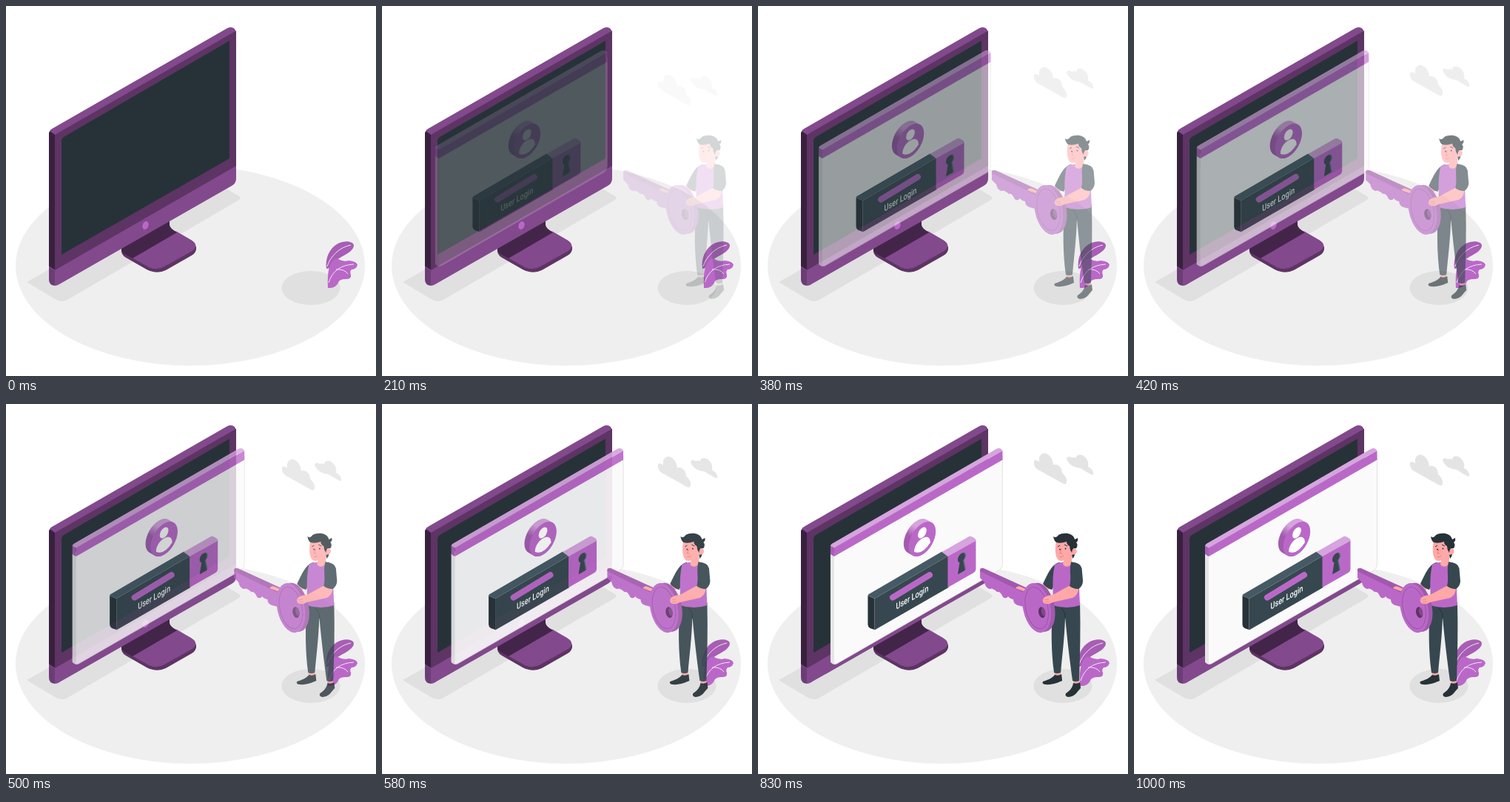
These frames come from a looping animation (500x500 px, 1.04 s). An HTML page:

```html
<!DOCTYPE html>
<html lang="en">
<head>
<meta charset="utf-8">
<title>User login</title>
<style>
html, body { margin: 0; width: 100%; height: 100%; overflow: hidden; background: #fff }
svg { display: block; width: 100vw; height: 100vh }
text { font: 500 12.2px Roboto, sans-serif }
</style>
</head>
<body>
<svg viewBox="0 0 500 500">
  <defs>
    <linearGradient id="rim" gradientUnits="userSpaceOnUse" x1="-19" y1="11" x2="11" y2="-19">
      <stop offset=".4" stop-color="#a35bb0"/><stop offset=".7" stop-color="#d6a4de"/>
    </linearGradient>
    <path id="hole" d="M-2.6 -1A5.6 5.8 0 1 1 2.6 -1L5.5 13.5H-5.5Z"/>
  </defs>

  <!-- floor and shadows -->
  <ellipse cx="249" cy="351" rx="236" ry="135" fill="#efefef"/>
  <path fill="#e0e0e0" d="M28 373L66 396Q75 402 83 397L315 262Q318 259 315 257L298 247L60 355Z"/>
  <ellipse cx="412" cy="381" rx="39.5" ry="23" fill="#e0e0e0"/>

  <!-- monitor -->
  <path fill="#5d3464" d="M156 328Q155 336 162 340L190 356Q204 363 216 357L251 337Q258 333 257 325L200 320Z"/>
  <path fill="#82498c" d="M221 298Q222 302 231 305L250 316Q258 321 256 326Q255 329 250 332L214 352Q204 358 193 353L170 340Z"/>
  <path fill="#43254a" d="M156 325L221 288V296Q222 301 231 306L171 341L162 336Q156 333 156 330Z"/>
  <path fill="#82498c" d="M58 174Q58 168 62 166L299 30Q308 26 311 35L66 176Z"/>
  <path fill="#5d3464" d="M66 174L311 33.500V218L66 358Z"/>
  <path fill="#3a203f" d="M58 171Q60 169 62 171L66 174V357L58 352Z"/>
  <path fill="#82498c" d="M66 357L311 216V233Q311 240 305 243L72 376Q69 378 66 378Z"/>
  <path fill="#6c3d75" d="M58 352L66 357V378Q58 377 58 370Z"/>
  <path fill="#263238" d="M75 182Q75 179 78 177L302 47V206L75 336Z"/>
  <ellipse cx="188.500" cy="296.500" rx="4" ry="5.600" transform="rotate(20 188.500 296.500)" fill="#ba68c8"/>

  <!-- plant -->
  <path fill="#a75eb4" d="M433 355C431 341 437 328 447 322C455 317 468 317 470 323C470 329 464 333 457 337C448 342 440 346 438 354Z"/>
  <path fill="#ba68c8" d="M435 381C434 362 436 351 441 345Q444 340 449 342Q456 346 463 344Q474 345 475 350Q473 356 467 356Q464 359 466 363Q467 369 460 369Q450 369 449 374Q445 382 435 381Z"/>
  <path fill="none" stroke="#f3e3f5" d="M434 352C438 339 450 326 466 323M436 374C441 358 452 350 470 349M446 356Q457 355 462 362"/>

  <g id="clouds" fill="#e4e4e4">
    <path d="M373 82C372 77 376 77 380 80C379 72 383 68 388 68.500C395 71 398 76 399 84C406 82 411 88 411 95C416 99 419 106 416 110C413 111 408 107 404 105L379 91C375 89 373 85 373 82Z"/>
    <path d="M417 76C418 72 422 73 424 75Q426 73 430 75C430 70 437 69 441 73C446 77 447 82 446 87C450 88 454 93 453 98C449 97 445 94 441 92Q436 88 431 88C423 86 419 81 417 76Z"/>
  </g>

  <g id="panel">
    <path fill="#fafafa" stroke="#dcdcdc" stroke-width=".8" d="M100 200L328 70V217Q328 222 323 225L104 351Q100 353 96 349Z"/>
    <path fill="#e6e6e6" d="M95.500 202L100.500 206V352L97 350Q95.500 349 95.500 346Z"/>
    <path fill="#ba68c8" d="M100.500 194L328 63V75.500L100.500 206Z"/>
    <path fill="#a95fb6" d="M95.500 191L100.500 194V206L95.500 203Z"/>
    <path fill="#d6a4de" d="M95.500 191.500Q96 189.500 98 188.500L320 60.500Q325 58 328 63L100.500 194.500Z"/>

    <!-- avatar badge -->
    <g transform="matrix(.866 -.5 0 1 219.500 182.500)" fill="#fff">
      <path d="M0 0L-8 -8" stroke="url(#rim)" stroke-width="42" stroke-linecap="round"/>
      <circle r="21" fill="#ba68c8"/>
      <circle cy="-8.500" r="6.800"/>
      <path d="M-12.500 11C-13 -5 13 -5 12.500 11Q0 22 -12.500 11Z"/>
    </g>

    <!-- login bar -->
    <path fill="#263238" d="M146 259L155 263V305L149 303Q146 301 146 298Z"/>
    <path fill="#37474f" d="M155 263L255 205V248L155 305.500Z"/>
    <path fill="#455a64" d="M146 259Q146 257 149 256L246 199.500L255 205L155 263Z"/>
    <path fill="#ba68c8" d="M254 205.500L292 184V223Q292 226 289 228L254 248Z"/>
    <path fill="#d6a4de" d="M246 200L281 180Q284 178 287 179.500L291 182Q292 183 292 185L254 206Z"/>
    <path stroke="#ba68c8" stroke-width="8" stroke-linecap="round" d="M179.500 261.500L229.500 231"/>
    <text transform="matrix(.75 -.433 0 1 184 278)" fill="#fff">User Login</text>
    <g transform="matrix(.866 -.5 0 1 273 213.500)">
      <use href="#hole" x=".8" fill="#546e7a"/>
      <use href="#hole" x="-.8" fill="#37474f"/>
    </g>
  </g>

  <g id="man">
    <!-- shoes, legs -->
    <path fill="#ffa8a7" d="M402 360H411V369H403ZM428 371H436V380H429Z"/>
    <path fill="#263238" d="M403 366Q408 368 412 365L413 374C408 376 400 380 390 379Q385 378 387 375C393 373 399 371 403 366Z"/>
    <path fill="#263238" d="M428 377Q433 379 437 376L438 384C434 387 431 396 421 396Q416 395 418 391C424 387 427 383 428 377Z"/>
    <path fill="#37474f" d="M400 268L437 268C438 305 437 340 436 374Q431 376 427 374C423 345 420 320 417 288C416 318 413 340 411 363Q406 365 402 363C398 335 398 305 400 268Z"/>
    <path fill="none" stroke="#263238" d="M417 290Q418 282 412 276"/>

    <!-- far arm -->
    <path fill="none" stroke="#ffa8a7" stroke-width="10" stroke-linecap="round" d="M394 245L378 257L357 252"/>
    <path fill="#37474f" d="M410 214C399 215 393 231 387 243Q392 249 399 251L405 240Z"/>

    <!-- torso and head -->
    <path fill="#ba68c8" d="M403 217Q409 214 413 214L426 213Q434 216 435 228L437 272Q420 278 400 272C402 255 398 240 403 217Z"/>
    <path fill="#ffa8a7" d="M405 185C403 195 403 206 408 211Q412 213 415 211L414 217Q419 223 426 216L426 204C434 205 435 194 428 195L423 184Z"/>
    <path fill="#263238" d="M401 179Q405 182 408 177C415 173 428 174 430 183L434 181Q435 185 432 187Q435 190 432 195L428 195Q426 198 426 201Q423 197 423 192Q419 190 419 186Q411 189 405 187Q402 185 401 179ZM426 204L430 203Q430 206 427 209Z"/>
    <g fill="#263238">
      <circle cx="410" cy="196.500" r="1"/><circle cx="417.500" cy="195.500" r="1"/>
    </g>
    <path fill="none" stroke="#263238" d="M407 193L410 191M416 190L420 192"/>
    <path fill="none" stroke="#e57f83" d="M412 196L410 202L413 202M410 206.500Q413 207 415 205"/>

    <!-- key -->
    <path fill="#ba68c8" d="M302 225L361 254V274L353 272Q347 270 347 264Q342 263 340 260Q337 264 333 261Q329 252 325 254Q319 248 315 250Q309 248 308 241L302 235Z"/>
    <path fill="#a159ad" d="M302 226V223Q304 221 307 222L364 248L361 255Z"/>
    <path fill="#ffa8a7" d="M350 249Q352 245 357 247L364 250L361 253Z"/>
    <g transform="rotate(-12 381 274.500)">
      <ellipse cx="384" cy="275.500" rx="18.500" ry="33.500" fill="#a159ad"/>
      <ellipse cx="378.500" cy="275" rx="18.500" ry="34" fill="#ba68c8"/>
      <ellipse cx="378.500" cy="275" rx="15" ry="28.500" fill="none" stroke="#9c57a8"/>
      <ellipse cx="384" cy="282.500" rx="4.500" ry="7.500" fill="#5d3464"/>
      <ellipse cx="386" cy="282" rx="2.500" ry="5.500" fill="#82498c"/>
    </g>

    <!-- near arm -->
    <path fill="#ffa8a7" d="M424 245L435 249Q435 258 427 262L400 268Q394 272 388 269Q385 265 389 261Q394 258 400 258Z"/>
    <path fill="none" stroke="#e57f83" stroke-width=".7" d="M389 265L395 264M390 268L396 267"/>
    <path fill="#37474f" d="M425 213.500Q438 214 439.500 222L441 239Q441 246 435 250Q428 250 423 246C426 235 422 226 425 213.500Z"/>
  </g>
</svg>
<script>
const LOOP = 1040, STEPS = 25, SLIDE = 30, LEAD = .024;
const [clouds, panel, man] = ["clouds", "panel", "man"].map(id => document.getElementById(id));

const curve = (s, a, b) => 3 * (1 - s) ** 2 * s * a + 3 * (1 - s) * s * s * b + s ** 3;

// cubic-bezier(.36, -.01, .5, 1.38): arrives with a small overshoot
function ease(x) {
  if (x >= 1) return 1;
  let lo = 0, hi = 1;
  for (let i = 0; i < 24; i++) {
    const mid = (lo + hi) / 2;
    if (curve(mid, .36, .5) < x) lo = mid; else hi = mid;
  }
  return curve(lo, -.01, 1.38);
}

function place(el, x, y, alpha) {
  el.setAttribute("transform", `translate(${x} ${y})`);
  el.setAttribute("opacity", alpha);
}

const start = performance.now();

function draw() {
  const t = (performance.now() - start) % LOOP;
  const step = Math.min(STEPS - 1, Math.floor((t + 6) * STEPS / LOOP));
  const p = step ? ease(step / (STEPS - 1) + LEAD) : 0;
  const alpha = Math.max(0, Math.min(1, p));
  const gap = SLIDE * (1 - p);
  place(panel, .5 - gap, 0, alpha);
  place(man, gap, 0, alpha);
  place(clouds, 0, gap, alpha);
  requestAnimationFrame(draw);
}
draw();
</script>
</body>
</html>
```
